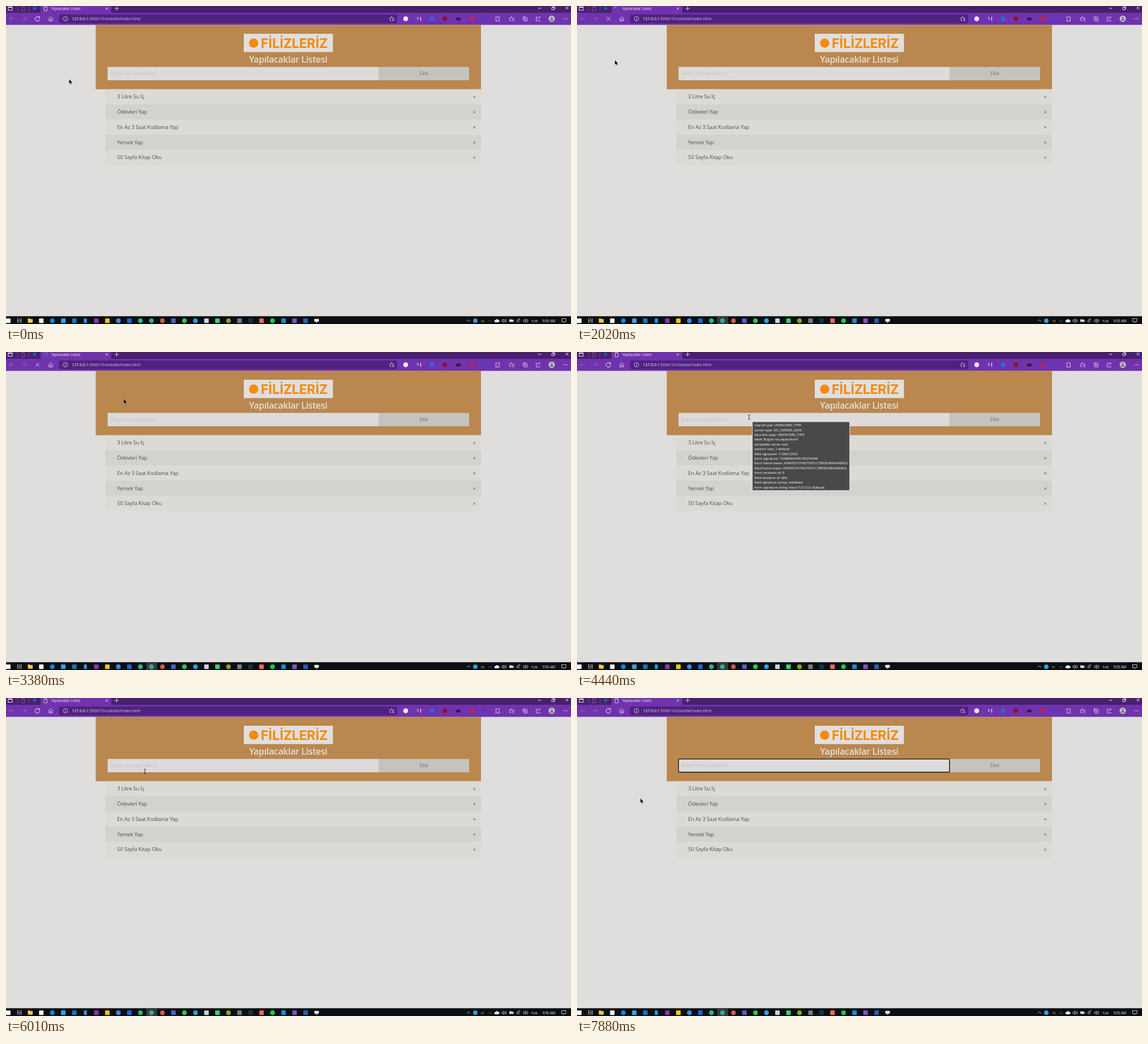
Animation of 998x561 px, one loop 8000 ms. Source, as an HTML page:

```html
<!DOCTYPE html>
<html lang="tr">
<head>
<meta charset="utf-8">
<title>Yapılacaklar Listesi</title>
<style>
  html, body { margin: 0; width: 100%; height: 100%; overflow: hidden; background: #dfdedd; }
  svg { display: block; width: 100%; height: 100%; }
  text { font-family: "Open Sans", "Noto Sans", sans-serif; letter-spacing: -.018em; white-space: pre; }
</style>
</head>
<body>
<svg id="stage" viewBox="0 0 998 561" preserveAspectRatio="none"></svg>
<script>
const LOOP = 8000;
const INPUT = { left: 179.5, right: 658, top: 107.5, bottom: 131 };

// Drawing helpers, all returning SVG markup
const rect = (x, y, w, h, fill, more = '') =>
  `<rect x="${x}" y="${y}" width="${w}" height="${h}" fill="${fill}" ${more}/>`;
const dot = (x, y, r, fill, more = '') => `<circle cx="${x}" cy="${y}" r="${r}" fill="${fill}" ${more}/>`;
const line = (d, color = '#ded0ee', width = .9, more = '') =>
  `<path d="${d}" fill="none" stroke="${color}" stroke-width="${width}" ${more}/>`;
const label = (x, y, text, size, fill, more = '') =>
  `<text x="${x}" y="${y}" font-size="${size}" fill="${fill}" ${more}>${text.replace(/&/g, '&amp;')}</text>`;
const group = (id, content) => `<g id="${id}">${content}</g>`;
const cross = (x, y, r, color, width) =>
  line(`M${x - r} ${y - r}l${2 * r} ${2 * r}m0 ${-2 * r}l${-2 * r} ${2 * r}`, color, width);
const pageIcon = (x, color) => line(`M${x - 2.5} .5h3.2l2 2v6h-5.2zM${x + .7} .5v2h2`, color, .8);

function browserBar() {
  const dim = '#9568c2';
  return rect(0, 0, 998, 12.5, '#48206f')
    + rect(0, 12, 998, 21.3, '#7033ad')
    + rect(61, -4, 125, 18, '#7033ad', 'rx="3"')
    + line('M20.5 0v10M40.5 0v10', '#7a56a0', .7)
    + rect(4, 1.5, 7, 6, 'none', 'stroke="#e6dcf0"') + rect(4, 1, 7, 2, '#e6dcf0')
    + pageIcon(30, '#8566a3')
    + dot(50.5, 4, 3.8, '#2b3f91') + dot(50.5, 4, 1.2, '#4d8fd0')
    + label(80, 6.6, 'Yapılacaklar Listesi', 6.2, '#eee6f6')
    + cross(178, 4.5, 2, '#eee6f6', .9)
    + line('M195.500 .5v7.500M191.800 4.2h7.400', '#e6dcf0')
    + line('M940 4h5', '#fff') + line('M964 2.500h4v4h-4zM965.500 2.500v-1.500h4v4h-1.500', '#fff', .8)
    + cross(991, 3.5, 2.3, '#fff', .9)
    + line('M14 22.500H6m3.500-3.500L6 22.500l3.500 3.500M28 22.500h8m-3.500-3.500l3.500 3.500l-3.500 3.500', dim)
    + line('M75 22.500l4-4l4 4M76 21.700v4.800h2v-3h2v3h2v-4.800')
    + rect(93.5, 15, 597.5, 15.5, '#50227f', 'rx="3"')
    + dot(105, 22.5, 4, 'none', 'stroke="#ded0ee" stroke-width=".8"')
    + line('M105 22v3M105 20v1')
    + label(116.5, 25.2, '127.0.0.1<tspan fill="#d3c2e5">:5000/10-todolist/index.html</tspan>', 7.2, '#fff')
    + line('M681 18.500l1.300 2.600l2.700 .3l-2 2M681 18.500l-1.300 2.600l-2.700 .4l2 2l-.5 2.800l2-1M682 25h4m-2-2v4', '#ded0ee', .8)
    + dot(706, 22.5, 4.3, '#f4eff8')
    + line('M726 20.500h3M726 23h3M732.500 19v7', '#eee6f6', 1.2)
    + rect(749, 18.8, 7, 7.6, '#2d68dc', 'rx="1.500"')
    + rect(771.5, 18.8, 7.5, 7.5, '#8d1226', 'rx="1.500"')
    + rect(795, 20.5, 8, 5, '#30203c', 'rx="1.500"')
    + rect(818, 19.5, 8, 5.5, '#d61f35', 'rx="1"')
    + dot(845, 22.5, 4, '#4c3dc4')
    + line('M865 19.500h2a1.200 1.200 0 0 1 2.600 0h2v2.200a1.200 1.200 0 0 0 0 2.600v2.200h-6.600v-2a1.200 1.200 0 0 0 0-2.600z')
    + line('M892.500 18.500l-1.200 2.700l-2.800 .3l2 2l-.5 2.800l2.500-1.400M892.500 18.500l1.200 2.600h4M894 23.500h4M894.500 26h3.500')
    + line('M915 20.500h5.500v6H915zM913.500 24.500v-5.500h5M917.800 22v3M916.300 23.500h3', '#ded0ee', .8)
    + line('M939 19.500h-2.500v7h6.500v-2M938.500 24c0-3 2-4 5-4m-2-2l2 2l-2 2', '#ded0ee', .8)
    + dot(964, 22.5, 5.5, '#c9c3ce') + dot(964, 20.8, 1.8, '#77717d')
    + '<path d="M960.500 26a3.500 3.500 0 0 1 7 0z" fill="#77717d"/>'
    + [985, 988, 991].map(x => dot(x, 22.5, .8, '#eee6f6')).join('');
}

function page() {
  const tasks = ['3 Litre Su İç', 'Ödevleri Yap', 'En Az 3 Saat Kodlama Yap', 'Yemek Yap', '50 Sayfa Kitap Oku'];
  const rowHeight = 26.75;
  const rows = tasks.map((task, i) => {
    const y = 146.8 + i * rowHeight;
    return rect(175.5, y, 663.5, rowHeight, i % 2 ? '#d3d2cc' : '#dbdad5')
      + label(196.3, y + 16.6, task, 9.4, '#50515a')
      + cross(827.3, y + 13.7, 1.8, '#55555a', .9);
  }).join('');
  return rect(158.5, 33.3, 680.5, 113.5, '#ba874e')
    + rect(420, 49, 157.5, 32.3, '#e0dfde')
    + dot(437.5, 65.5, 8.3, '#f58a0c')
    + label(450, 74.3, 'FİLİZLERİZ', 24, '#f58a0c', 'style="font:700 24px Roboto,sans-serif;letter-spacing:0"')
    + label(498.5, 100.3, 'Yapılacaklar Listesi', 15.8, '#e3e0dc', 'font-weight="600" text-anchor="middle"')
    + rect(INPUT.left, INPUT.top, 478.5, 23.5, '#dcdbda')
    + label(184.5, 122.4, 'Bugün ne yapacaksın?', 8.26, '#c3c2c1')
    + rect(658, 107.5, 160, 23.5, '#c5c3be')
    + label(738.2, 122.4, 'Ekle', 8.4, '#77777b', 'text-anchor="middle"')
    + rows;
}

function taskbar() {
  const apps = ('#fff - #f4c64e #f4f4f4 #1683d8 #3aa0e8 #1673c8 #2497e0 #8b35b8 #f7c515 #3f87dd #2461da #29b58c #36aa83 '
    + '#d0574c #5560c8 #32c45a #2aa1dc #c8d4e8 #3dcf73 #85a51d #777c80 #12344b #ef6b50 #20c45a #2387d5 #8451c4 #285fb8 -').split(' ');
  const round = [4, 10, 12, 13, 14, 16, 17, 20, 24];
  const icons = apps.map((color, i) => {
    const x = 4 + i * 19.45;
    if (i === 1) return line(`M${x - 3} 551v8M${x + 3.5} 551v8M${x - 3} 555h6.500M${x - 1} 552h3M${x - 1} 558h3`, '#ddd');
    if (i === 28) return rect(x - 4, 552, 8, 4.8, '#eee') + rect(x - 1, 557, 2, 1.6, '#eee');
    if (i === 2) return rect(x - 4.3, 551.3, 4, 2, color) + rect(x - 4.3, 552.3, 8.6, 6.4, color);
    const w = i === 7 ? 5.5 : 8;
    return round.includes(i) ? dot(x, 555.2, 4.2, color) : rect(x - w / 2, 551.3, w, 8, color, 'rx=".8"');
  }).join('');
  const speaker = x => line(`M${x - 4} 554h1.500l2-2v6.500l-2-2h-1.500zM${x + 1} 553.500q1.500 1.700 0 3.500M${x + 2.500} 552q3 3.200 0 6.500`, '#ddd', .8);
  return rect(0, 547.3, 998, 13.7, '#0b0f11')
    + group('activeApp', rect(247.5, 547.3, 19.5, 13.7, '#343a3c'))
    + icons
    + line('M814 556.500l3-3l3 3', '#ddd')
    + dot(829, 555.2, 4, '#2aa1dc')
    + label(842, 557.5, '', 6.1, '#e3a52a', 'id="warm" text-anchor="middle"')
    + label(854.5, 557.5, '', 6.1, '#2b7fb5', 'id="cool" text-anchor="middle"')
    + '<path d="M864.500 558a2 2 0 0 1 0-4a3 3 0 0 1 5-.5a2.300 2.300 0 0 1 .5 4.500z" fill="#e6e6e6"/>'
    + speaker(880)
    + rect(889, 553.3, 7, 4, '#ddd') + line('M897 554.500v2M890 552v1.500M892 552v1.500', '#ddd')
    + line('M903 558a5 5 0 0 1 5-5M901.800 556.500a7 7 0 0 1 6-5M905 558.500a3 3 0 0 1 3-3', '#ccc', .8)
    + speaker(918)
    + label(933.3, 557.5, 'TUR', 6.1, '#f2f2f2', 'text-anchor="middle"')
    + label(958.7, 557.5, '9:50 AM', 6.2, '#f2f2f2', 'text-anchor="middle"')
    + line('M981.500 551.500h7.500v5.500h-2.700l-1.300 1.700v-1.700h-3.500z', '#eee', .8);
}

function tooltip() {
  const token = '45AFED1E74D75931C7B95E49E44AE8D2';
  const lines = ['overall type: UNKNOWN_TYPE', 'server type: NO_SERVER_DATA', 'heuristic type: UNKNOWN_TYPE',
    'label: Bugün ne yapacaksın?', 'parseable name: task', 'section: task_1-default',
    'field signature: 1106912593', 'form signature: 13408903495730254949',
    'form frame token: ' + token, 'field frame token: ' + token, 'form renderer id: 0',
    'field renderer id: 609', 'field signature string: task&text',
    'form signature string: http://127.0.0.1&&task'];
  return rect(0, 0, 172, 121.3, '#494949', 'stroke="#e8e8e8" stroke-width=".9"')
    + lines.map((text, i) => label(3.6, 8.2 + i * 8.41, text, 6.18, '#fff')).join('');
}

document.getElementById('stage').innerHTML = rect(0, 0, 998, 561, '#dfdedd')
  + browserBar() + page() + taskbar()
  + group('idleTab', pageIcon(70, '#e6dcf0')
    + line('M58.700 20.200a4 4 0 1 0 .8 2.800M59.200 18v2.700h-2.700', '#eee6f6', 1))
  + group('busyTab', dot(70, 4.3, 3.4, 'none', 'id="spinner" stroke="#8fa8f0" stroke-width="1"')
    + cross(55.5, 22.5, 3, '#eee6f6', .9))
  + group('focusRing', rect(179.5, 107.700, 478.5, 23, 'none', 'rx="1.500" stroke="#151515" stroke-width="1.500"')
    + rect(180.8, 109, 475.9, 20.4, 'none', 'stroke="#f2f2f2" stroke-width=".6"'))
  + group('tip', tooltip())
  + group('cursor', dot(0, 0, 5.3, '#f0e62e', 'id="press" opacity=".85"')
    + '<path id="arrow" d="M0 0v8.200l1.900-1.700l1.300 2.900l1.300-.6l-1.300-2.800h2.500z" fill="#000" stroke="#eee" stroke-width=".3"/>'
    + group('beam', line('M-1.800-4h1.300l.5 .5l.5-.5h1.300M0-3.500v7M-1.800 4h1.300l.5-.5l.5 .5h1.300', '#222', .9)));

// Pointer path: time, x, y
const path = [
  [0, 111.5, 129], [30, 102, 131], [200, 102, 131], [950, 62, 32], [1090, 57, 24], [1250, 57, 24],
  [1810, 67, 95.5], [2750, 67, 95.5], [3380, 208, 83], [3580, 242, 92], [4050, 304, 115],
  [4850, 304, 115], [5300, 202, 122], [5630, 236, 126], [6010, 245.5, 129.5], [6300, 122, 140],
  [6440, 157, 146], [6780, 219, 118], [7340, 219, 118], [7640, 70, 152], [7880, 112, 177], [LOOP, 112, 177]
];
// Sensor readings in the tray: start time, first value, second value
const readings = [[0, 69, 71], [400, 75, 71], [1400, 78, 72], [2400, 80, 72], [3450, 81, 73],
  [5400, 81, 75], [6400, 79, 76], [7400, 79, 75]];

const el = id => document.getElementById(id);
const show = (id, on) => el(id).style.display = on ? '' : 'none';
const within = (t, from, to) => t >= from && t < to;

function pointerAt(t) {
  const next = path.findIndex(p => p[0] > t);
  const [t0, x0, y0] = path[next - 1], [t1, x1, y1] = path[next];
  if (t < 30) return [x0, y0];
  const k = (t - t0) / (t1 - t0), eased = k * k * (3 - 2 * k);
  return [x0 + (x1 - x0) * eased, y0 + (y1 - y0) * eased];
}

function draw(t) {
  const [x, y] = pointerAt(t);
  const overInput = x > INPUT.left && x < INPUT.right && y > INPUT.top && y < INPUT.bottom;
  el('cursor').setAttribute('transform', `translate(${x} ${y})`);
  show('arrow', !overInput);
  show('beam', overInput);
  show('press', within(t, 1110, 1230) || within(t, 7200, 7340));

  const loading = within(t, 1200, 3600);
  show('idleTab', !loading);
  show('busyTab', loading);
  el('spinner').setAttribute('stroke-dasharray', t < 2600 ? '5 16.360' : '1.400 2.160');
  el('spinner').setAttribute('transform', `rotate(${180 + (t - 2020) * .36} 70 4.3)`);

  show('tip', within(t, 4440, 4850) || within(t, 7200, 7270));
  el('tip').setAttribute('transform', t < 6000 ? 'translate(309.7 123)' : 'translate(224.7 126)');
  show('focusRing', t >= 7270);
  show('activeApp', t >= 30);

  const [, warm, cool] = readings.findLast(r => r[0] <= t);
  el('warm').textContent = warm;
  el('cool').textContent = cool;
}

const start = performance.now();
function tick() {
  draw((performance.now() - start) % LOOP);
  requestAnimationFrame(tick);
}
tick();
</script>
</body>
</html>
```
